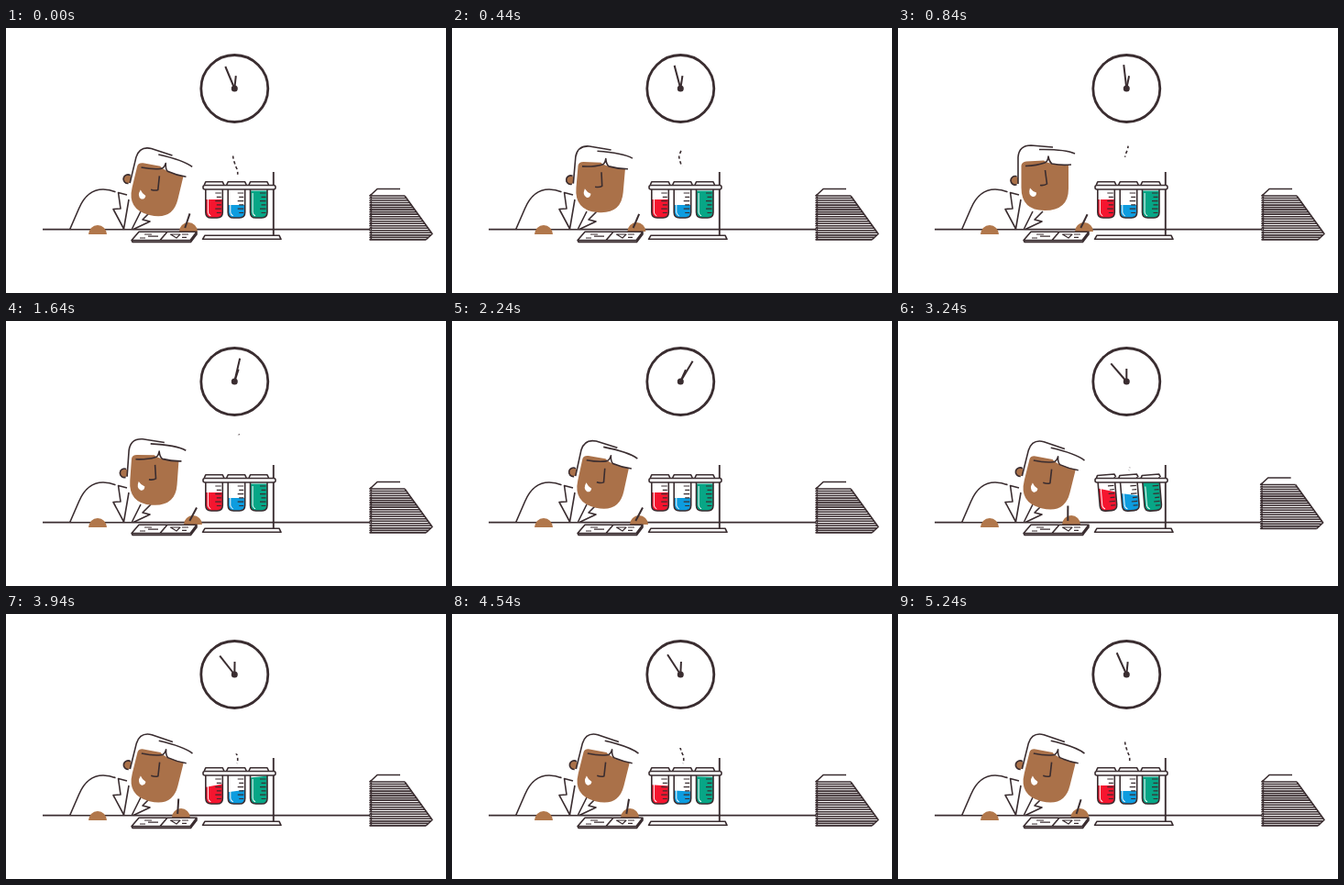
An HTML page that plays this animation: 480x289 px, repeating every 5.34 s.

```html
<!DOCTYPE html>
<html lang="en">
<head>
<meta charset="utf-8">
<title>Late in the lab</title>
<style>
  html, body { margin: 0; width: 100%; height: 100%; overflow: hidden; background: #fff; }
  svg { display: block; width: 100%; height: 100%; }
  .line { fill: none; stroke: #3a2d30; stroke-width: 1.6; stroke-linejoin: round; }
  .bold { stroke-width: 2; }
  .thin { stroke-width: 1.2; }
  .paper { fill: #fff; }
  .ink { fill: #3a2d30; }
  .face { fill: #aa7149; }
  .hand { fill: #b1774b; }
</style>
</head>
<body>
<svg viewBox="0 0 480 289">
  <defs>
    <clipPath id="glass"><path d="M0 168H18.5V201Q18.5 207 12.5 207H6Q0 207 0 201Z"/></clipPath>
    <clipPath id="wisp"><rect id="wispBox" x="235" width="30"/></clipPath>
  </defs>

  <circle class="line" cx="249.3" cy="66" r="36.5" style="stroke-width:2.8"/>
  <path id="minute" class="line bold" d="M249.3 66V40"/>
  <path id="hour" class="line bold" d="M249.3 66V52"/>
  <circle class="ink" cx="249.3" cy="66" r="3.5"/>

  <path class="line" d="M40 219.6H397" style="stroke-width:1.7"/>

  <path class="paper" d="M71 218.7L81 197Q90 177 106 177L119 179L134 184L158 200L140 218.7Z"/>
  <g class="line">
    <path d="M69.7 219.5L79.7 196.5Q88.5 176 106 176Q113 176 119.5 178.7"/>
    <path d="M132 182L122.5 179.5L125 197L117 197.5L128.5 219"/>
    <path d="M134 187L128.5 219M147 200L137.5 219"/>
    <path d="M158 200L149 209L157 211L139 219.5"/>
  </g>
  <path class="hand" d="M90 225A10 10 0 0 1 110 225Z"/>

  <g id="head">
    <circle class="face" cx="127.2" cy="166.3" r="4.8"/>
    <path class="line" d="M129.5 161.8A4.8 4.8 0 1 0 129.5 170.8"/>
    <path class="paper" d="M131 170V141Q132 128 145 128L169 130L193 137L189 150L186 180H134Z"/>
    <path class="face" d="M134.5 150Q135 146 140 145.5L159 144.5Q164 149 186 149V175Q186 199 160 199Q134.5 199 134.5 174Z"/>
    <path class="line" d="M131 170V141Q132 128 145 128L169 130M154 132.5Q182 132 193 137"/>
    <path class="line" d="M139 150.5Q152 150 160 147Q163.5 146 164 140Q165 146 168 148Q178 150 189 149"/>
    <path class="line" d="M160.5 155L162.5 170Q160 172 155 171.5"/>
    <path class="paper" d="M144 174.5Q141.5 182 147 184Q151 184 151 179.5Q147 178.5 144 174.5Z"/>
  </g>

  <g id="writer">
    <path class="hand" d="M-10 222A10 10 0 0 1 10 222Z"/>
    <path id="pen" class="line bold" d="M-3.7 218V201.5"/>
  </g>

  <path class="paper" d="M145 222.3H208L201 231.5H137Z"/>
  <g class="line">
    <path d="M145 222.3H208L201 231.5H137ZM137 231.5L138 233.4H201.5L208 225V222.3M176 222.3L168 231.5"/>
    <path class="line thin" d="M151 225H159M146 229H152M155 227.2H166M192 225H199M192 228.3H197M179.5 225H190L186 229Z"/>
  </g>

  <path class="line" clip-path="url(#wisp)" stroke-dasharray="3.2 2.8" stroke-dashoffset="3"
    d="M252 163Q253.5 159 252 154Q246.5 141 248 138Q251 132 251 129Q252 126 256 122.5"/>

  <path class="line" d="M291.8 157V226" style="stroke-width:1.9"/>
  <g id="tubes"></g>
  <rect class="line" x="215" y="171.5" width="79" height="4.5" rx="2" style="fill:#fff"/>
  <path class="line" d="M217 226.2H298L300 230.3H214.5Z" style="fill:#fff"/>

  <g id="stack" class="line">
    <path class="paper" stroke="none" d="M397 183L405 175.5H430L436 183L465 224L458 231H397Z"/>
    <path d="M397 183L405 175.5H430M435 183L465 224.5L458 231"/>
  </g>
</svg>
<script>
const LOOP = 5340, START = 3040;
const $ = id => document.getElementById(id);

function add(parent, name, attrs) {
  const el = document.createElementNS("http://www.w3.org/2000/svg", name);
  for (const key in attrs) el.setAttribute(key, attrs[key]);
  return parent.appendChild(el);
}

function ease(from, to, s) {
  const p = Math.min(1, Math.max(0, (s - from) / (to - from)));
  return p * p * (3 - 2 * p);
}

const wave = (s, period) => Math.sin(2 * Math.PI * s / period);

const tubes = [
  { x: 217.8, level: 187, color: "#f5152f", slosh: 1 },
  { x: 242.2, level: 193, color: "#0d9cdf", slosh: .7 },
  { x: 266.5, level: 177.5, color: "#07a686", slosh: .5 }
];
for (const tube of tubes) {
  const g = tube.group = add($("tubes"), "g", {});
  const glass = "V201Q0 207 6 207H12.5Q18.5 207 18.5 201V";
  add(g, "path", { class: "paper", d: `M0 168${glass}168Z` });
  tube.liquid = add(g, "path", { fill: tube.color, "clip-path": "url(#glass)" });
  add(g, "path", { d: "M2.6 180V201Q3 204 5.5 204.8", fill: "none", stroke: "#fff" });
  let ticks = "";
  for (let i = 0; i < 6; i++) ticks += `M${i % 2 ? 12 : 10.5} ${180 + i * 4.3}H17`;
  add(g, "path", { class: "line thin", d: ticks });
  add(g, "path", { class: "line", d: `M0 170${glass}170` });
  add(g, "path", { class: "line", d: "M-1.5 171L0 167.8H18.5L20 171", style: "fill:#fff" });
}

const stack = $("stack");
for (let y = 183; y < 232; y += 2.52) {
  const right = Math.min(435 + (y - 183) * .72, 689 - y);
  add(stack, "path", { d: `M399 ${y - 1.5}L397 ${y}H${right}` });
}

function draw(t) {
  // Ten poses a second, the first one short.
  t = t < 40 ? 0 : 40 + Math.floor((t - 40) / 100) * 100;
  // Seconds since the bump on the table.
  const s = (t - START + LOOP) % LOOP / 1000;

  const turn = 3.48 * s * s;
  $("minute").setAttribute("transform", `rotate(${turn - 41} 249.3 66)`);
  $("hour").setAttribute("transform", `rotate(${turn / 3} 249.3 66)`);

  const nod = 1 - ease(2.2, 3.1, s) + 1.1 * ease(3.4, 5, s);
  $("head").setAttribute("transform", `translate(${3 * nod} ${6 * nod}) rotate(${14 * nod} 160 172)`);

  const write = ease(.1, 3.7, s);
  $("writer").setAttribute("transform", `translate(${189 + 15 * write} 0)`);
  $("pen").setAttribute("transform", `rotate(${28 * write} -3.7 218)`);

  const lift = s < .4 ? -4.5 * wave(s, .8) : 0;
  stack.setAttribute("transform", `translate(${lift * .3} ${lift})`);

  const sway = -13 * Math.exp(-5 * s) * wave(s, .8);
  const tip = 4 * Math.max(0, 1 - s / 1.8) * wave(s, 1.2);
  for (const { x, level, slosh, group, liquid } of tubes) {
    const y = level + lift * (1.5 - slosh), d = tip * slosh;
    group.setAttribute("transform", `translate(${x} 0) rotate(${sway} 9 172)`);
    liquid.setAttribute("d", `M-1 ${y - d}L20 ${y + d}V210H-1Z`);
  }

  const top = 162 - 10.7 * s, end = 164 - 42 * ease(1.8, 4.3, s);
  $("wispBox").setAttribute("y", top);
  $("wispBox").setAttribute("height", Math.max(0, end - top));
}

const begin = performance.now();
function tick() {
  draw((performance.now() - begin) % LOOP);
  requestAnimationFrame(tick);
}
tick();
</script>
</body>
</html>
```
